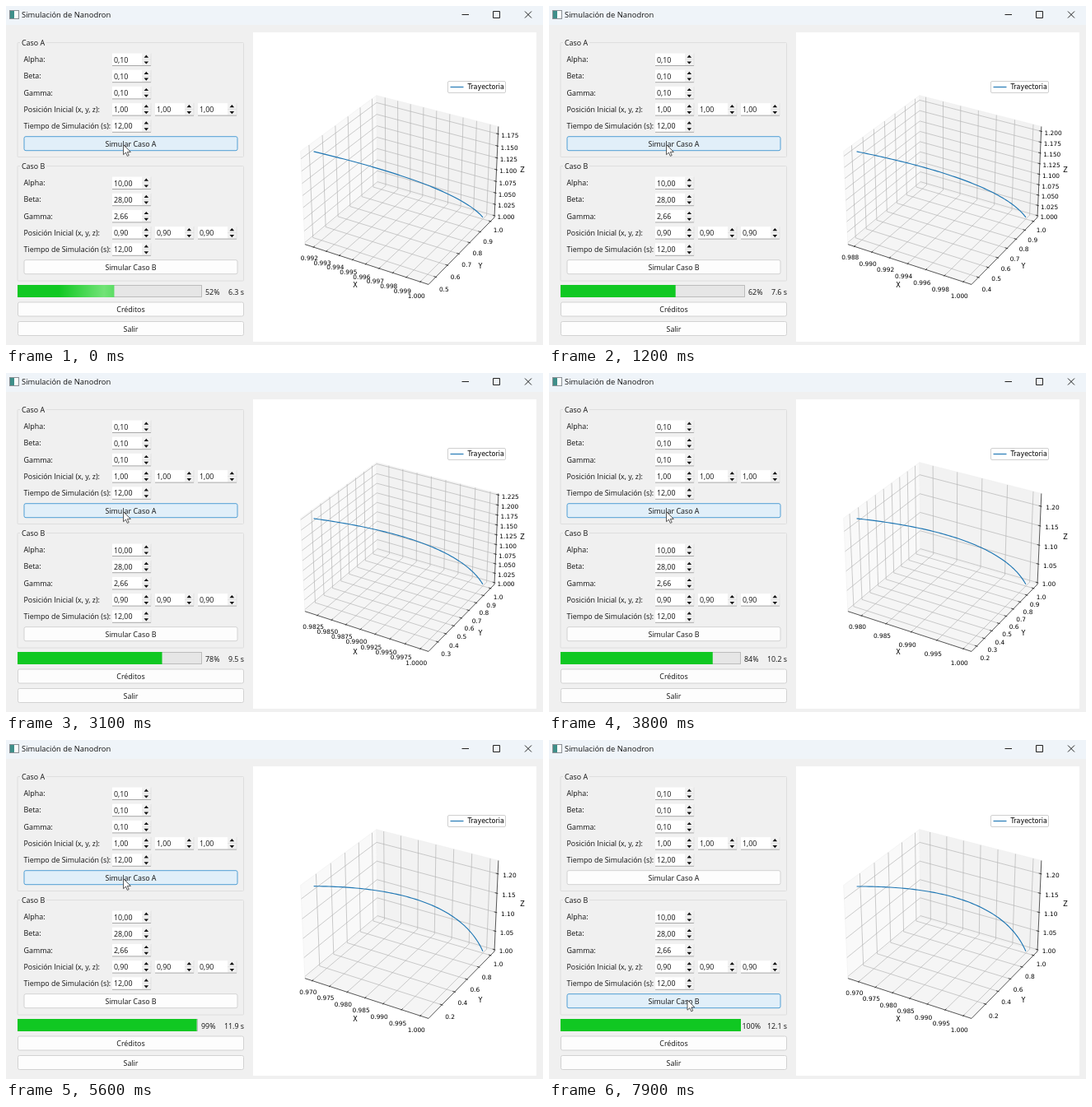
Write an HTML page that moves like this. It is 652 px wide and 412 px high and loops after 8000 ms.

```html
<!DOCTYPE html>
<html lang="es">
<head>
<meta charset="utf-8">
<title>Simulación de Nanodron</title>
<style>
  html, body { margin: 0; width: 100%; height: 100%; overflow: hidden; background: #f0f0f0; }
  svg { display: block; width: 652px; height: 412px; }
  text { font: 8.9px "Open Sans", "Noto Sans", sans-serif; fill: #111; white-space: pre; }
  .title { font-size: 9.4px; }
  .plot { font: 8px "DejaVu Sans", sans-serif; fill: #000; }
  .tick { font: 7.4px "DejaVu Sans", sans-serif; fill: #000; }
</style>
</head>
<body>
<svg viewBox="0 0 652 412">
  <defs>
    <linearGradient id="glow">
      <stop offset="0" stop-color="#b4f5b0" stop-opacity="0"/>
      <stop offset=".5" stop-color="#b4f5b0" stop-opacity=".6"/>
      <stop offset="1" stop-color="#b4f5b0" stop-opacity="0"/>
    </linearGradient>
    <clipPath id="fillClip"><rect id="fillArea" x="14" y="339" height="15" width="0"/></clipPath>
  </defs>
  <g id="window"></g>
  <g id="buttons"></g>
  <g id="progress"></g>
  <g id="plot"></g>
  <path id="cursor" d="M0 0V12.2L2.9 9.6L4.8 13.9L6.7 13L4.8 8.9H8.8Z" fill="#fff" stroke="#333" stroke-width=".8"/>
</svg>
<script>
const LOOP = 8000, STEP = 100;
const $ = id => document.getElementById(id);
const clamp = v => Math.max(0, Math.min(1, v));
const lerp = (a, b, u) => a + (b - a) * u;

// SVG string helpers; text is centred vertically on cy
const text = (x, cy, s, cls = '', anchor = 'start') =>
  `<text x="${x}" y="${cy + (cls === 'plot' || cls === 'tick' ? 2.8 : 3.2)}" class="${cls}" text-anchor="${anchor}">${s}</text>`;
const rect = (x, y, w, h, fill, stroke = 'none', r = 0) =>
  `<rect x="${x}" y="${y}" width="${w}" height="${h}" rx="${r}" fill="${fill}" stroke="${stroke}"/>`;
const path = (d, stroke, width = 1, fill = 'none') =>
  `<path d="${d}" fill="${fill}" stroke="${stroke}" stroke-width="${width}"/>`;

// ---- Static window ----
function spinBox(x, cy, value) {
  const y = cy - 7.5;
  return rect(x, y, 47, 15, '#fff') + rect(x + 36, y, 11, 14.5, '#f1f1f1') +
    path(`M${x} ${y + 15}H${x + 47}`, '#a8a8a8') +
    path(`M${x + 47} ${y}V${y + 15}M${x + 36} ${cy}h11`, '#d8d8d8', .6) +
    path(`M${x + 38.5} ${cy - 2.3}l2.8 -3.2l2.8 3.2ZM${x + 38.5} ${cy + 2.4}l2.8 3.2l2.8 -3.2Z`, 'none', 0, '#111') +
    text(x + 2, cy + .3, value);
}

function groupBox(name, top, height, values) {
  const labels = ['Alpha:', 'Beta:', 'Gamma:', 'Posición Inicial (x, y, z):', 'Tiempo de Simulación (s):'];
  let out = rect(14, top + .5, 274.5, height, 'none', '#dedede', 1) +
    rect(17, top - 5, 32, 11, '#f0f0f0') + text(19, top + .3, name);
  labels.forEach((label, i) => {
    const cy = top + 21 + i * 20.2;
    out += text(21.5, cy, label);
    [].concat(values[i]).forEach((v, j) => out += spinBox(129 + j * 52, cy, v));
  });
  return out;
}

$('window').innerHTML =
  rect(0, 0, 652, 412, '#f0f0f0') + rect(0, 0, 652, 23, '#eff4f9') +
  rect(4.5, 5.5, 11, 10, '#fff', '#8a8f94') + rect(5, 6, 5, 9, '#3f8f8a') +
  text(19, 10.8, 'Simulación de Nanodron', 'title') +
  path('M553.5 10.5H562M591.5 6.5H599.5V14.5H591.5ZM630 6.5L638 14.5M638 6.5L630 14.5', '#222') +
  groupBox('Caso A', 44, 139, ['0,10', '0,10', '0,10', ['1,00', '1,00', '1,00'], '12,00']) +
  groupBox('Caso B', 194, 139.5, ['10,00', '28,00', '2,66', ['0,90', '0,90', '0,90'], '12,00']) +
  rect(300, 32, 344, 376, '#fff');

function button(x, y, w, label, hover = 0) {
  const mix = (a, b) => `rgb(${a.map((v, i) => Math.round(lerp(v, b[i], hover)))})`;
  return rect(x + .5, y + .5, w - 1, 17, mix([253, 253, 253], [225, 239, 249]),
    mix([210, 210, 210], [80, 158, 212]), 2) + text(x + w / 2, y + 9.6, label, '', 'middle');
}

// ---- Simulation ----
function trajectory(duration, steps = 80) {
  const A = .1, B = .1, C = .1, dt = duration / steps;
  const slope = ([x, y, z]) => [A * (y - x), x * (B - z) - y, x * y - C * z];
  const add = (p, d, h) => p.map((v, i) => v + d[i] * h);
  const points = [[1, 1, 1]];
  for (let i = 0; i < steps; i++) {
    const p = points[i];
    points.push(add(p, slope(add(p, slope(p), dt / 2)), dt));
  }
  return points;
}

// ---- 3D plot: box seen from elevation 30°, azimuth -60° ----
const HALF = [.5714, .5714, .4286];
function project(p) {
  const [x, y, z] = p.map((v, i) => v * HALF[i]);
  const right = .866 * x + .5 * y, up = -.25 * x + .433 * y + .866 * z;
  const depth = .433 * x - .75 * y + .5 * z, k = 1505 / (10 - depth);
  return [480 + right * k, 218.3 - up * k];
}
const poly = points => 'M' + points.map(p => project(p).map(v => v.toFixed(2)).join(' ')).join('L');

function makeAxis(min, max, margin) {
  const pad = (max - min) * margin, lo = min - pad, hi = max + pad, range = hi - lo;
  const base = 10 ** Math.floor(Math.log10(range / 9));
  const step = [1, 2, 2.5, 5, 10].map(m => m * base).find(s => s >= range / 9 * .9999);
  let digits = 0;
  while (Math.abs(step * 10 ** digits - Math.round(step * 10 ** digits)) > 1e-6) digits++;
  const place = v => (2 * (v - lo) / range - 1) * .96;
  const ticks = [];
  for (let i = Math.ceil(lo / step); i * step <= hi + range * .005; i++)
    ticks.push({ at: place(i * step), label: (i * step).toFixed(digits) });
  return { place, ticks };
}

// Per axis: grid line, tick segment and label anchor at position v.
// Floor labels drop a little toward the near corner.
const OUT = 1.016, IN = .968, FAR = 1.12, DROP = .03;
const LAYOUT = [
  { grid: v => [[v, -1, -1], [v, 1, -1], [v, 1, 1]], tick: v => [[v, -OUT, -1], [v, -IN, -1]], label: v => [v, -FAR, -FAR - DROP * v] },
  { grid: v => [[1, v, -1], [-1, v, -1], [-1, v, 1]], tick: v => [[OUT, v, -1], [IN, v, -1]], label: v => [FAR, v, -FAR + DROP * v] },
  { grid: v => [[-1, -1, v], [-1, 1, v], [1, 1, v]], tick: v => [[OUT, 1, v], [IN, 1, v]], label: v => [FAR, FAR, v] }
];

function drawPlot(duration) {
  const points = trajectory(duration);
  const axes = [0, 1, 2].map(i => {
    const values = points.map(p => p[i]);
    return makeAxis(Math.min(...values), Math.max(...values), i < 2 ? .05 : 0);
  });
  let grid = '', marks = '', labels = '';
  axes.forEach(({ ticks }, i) => ticks.forEach(({ at, label }) => {
    grid += poly(LAYOUT[i].grid(at));
    marks += poly(LAYOUT[i].tick(at));
    const [x, y] = project(LAYOUT[i].label(at));
    labels += text(x + .6, y + 3.4, label, 'tick', 'middle');
  }));
  const pane = (corners, fill) => path(poly(corners) + 'Z', '#eeeeee', .6, fill);
  const curve = points.map(p => p.map((v, i) => axes[i].place(v)));
  $('plot').innerHTML =
    pane([[-1, -1, -1], [-1, 1, -1], [-1, 1, 1], [-1, -1, 1]], '#f9f9f9') +
    pane([[-1, 1, -1], [1, 1, -1], [1, 1, 1], [-1, 1, 1]], '#f2f2f2') +
    pane([[-1, -1, -1], [1, -1, -1], [1, 1, -1], [-1, 1, -1]], '#f5f5f5') +
    path(grid, '#b0b0b0', .65) +
    path(poly([[-1, -1, -1], [1, -1, -1], [1, 1, -1], [1, 1, 1]]) + marks, '#000', .65) +
    labels + path(poly(curve), '#1f77b4', 1.15) +
    text(424, 339.3, 'X', 'plot', 'middle') + text(576, 316.5, 'Y', 'plot', 'middle') +
    text(627, 199, 'Z', 'plot', 'middle') +
    rect(536.5, 91.5, 70, 14, '#fff', '#d0d0d0', 1.5) + path('M539.5 98.5H555.5', '#1f77b4', 1.15) +
    text(560.5, 98.5, 'Trayectoria', 'plot');
}

// ---- Progress: updates arrive every 100 ms except at a few stalls ----
const STALLS = [4, 10, 13, 21, 32, 39, 47, 50, 53, 55], LAST_TICK = 57;
// update count, percent, elapsed seconds, simulated duration
const KEYS = [
  [0, 52, 6.3, .302], [10, 62, 7.6, .369], [17, 69, 8.3, .41], [27, 78, 9.5, .465],
  [40, 91, 11, .546], [46, 99, 11.9, .605], [47, 100, 12.1, .616]
];
function progressAt(time) {
  const tick = Math.min(LAST_TICK, Math.floor(time / STEP));
  const count = tick - STALLS.filter(s => s <= tick).length;
  const next = Math.max(1, KEYS.findIndex(k => k[0] >= count));
  const a = KEYS[next - 1], b = KEYS[next], u = (count - a[0]) / (b[0] - a[0]);
  const [, percent, seconds, duration] = a.map((v, i) => lerp(v, b[i], u));
  return { percent: Math.round(percent), seconds, duration };
}

const GLOW_STARTS = [-700, 1560, 4200];
function drawProgress(time, { percent, seconds }) {
  const long = seconds >= 9.95, width = long ? 219 : 224;
  const start = GLOW_STARTS.filter(s => s <= time).pop();
  const glowX = -111 + (time - start) * .25;
  $('fillArea').setAttribute('width', Math.min(width, width * percent / 100 + .8));
  $('progress').innerHTML =
    rect(14.5, 339.5, width - 1, 14, '#e6e6e6', '#bcbcbc') +
    `<g clip-path="url(#fillClip)">${rect(14, 339, 225, 15, '#10c822')}${rect(glowX, 339, 110, 15, 'url(#glow)')}</g>` +
    text(percent === 100 ? 234.5 : long ? 237 : 242, 347.3, percent + '%') +
    text(289, 347.3, seconds.toFixed(1) + ' s', '', 'end');
}

// ---- Playback ----
const origin = performance.now();
let shownTime, shownDuration;

function drawAt(time) {
  const state = progressAt(time);
  if (state.duration !== shownDuration) drawPlot(shownDuration = state.duration);
  drawProgress(time, state);
  $('buttons').innerHTML =
    button(21.5, 158.2, 260, 'Simular Caso A', 1 - clamp((time - 6800) / 400)) +
    button(21.5, 308.2, 260, 'Simular Caso B', clamp((time - 7400) / 400)) +
    button(14, 359.5, 275, 'Créditos') + button(14, 383, 275, 'Salir');
  const u = clamp((time - 6600) / 900), ease = u * u * (3 - 2 * u);
  $('cursor').setAttribute('transform', `translate(${lerp(142.5, 168, ease)} ${lerp(168.5, 316, ease)})`);
}

function play() {
  const elapsed = (performance.now() - origin) % LOOP;
  const time = Math.floor(elapsed / STEP) * STEP;
  if (time !== shownTime) drawAt(shownTime = time);
  requestAnimationFrame(play);
}
play();
</script>
</body>
</html>
```
